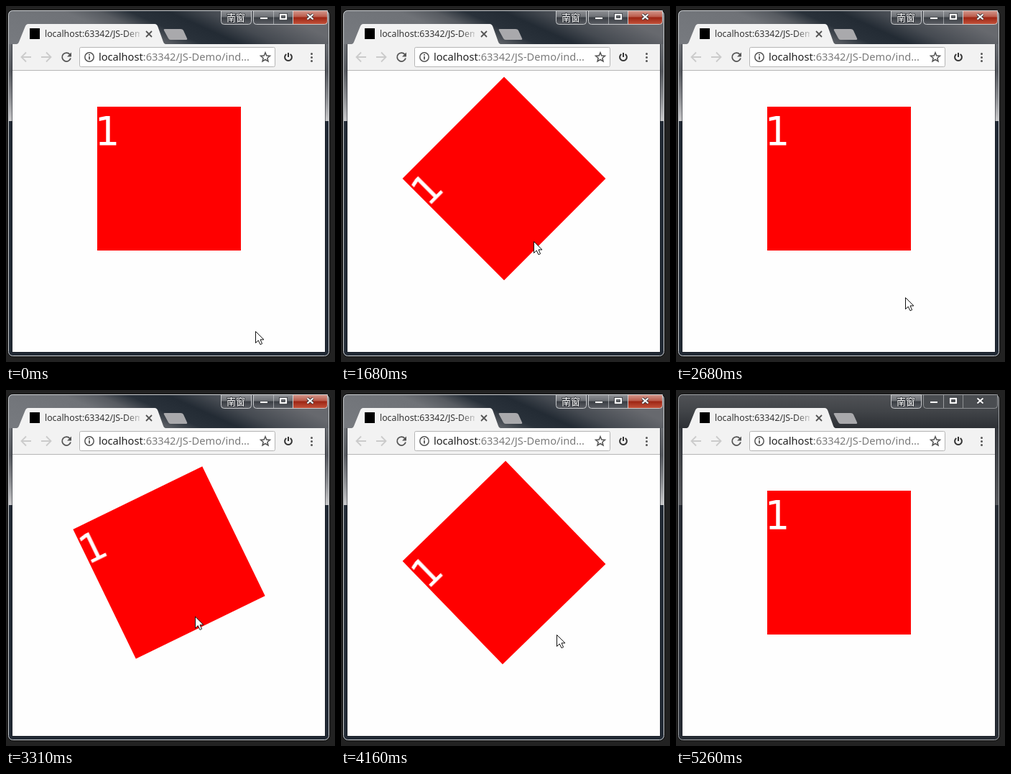
These frames come from a looping animation (458x495 px, 5.36 s). An HTML page:

```html
<!DOCTYPE html>
<html lang="en">
<head>
<meta charset="utf-8">
<title>Rotating box</title>
<style>
  html, body { margin: 0; width: 100%; height: 100%; overflow: hidden; background: #222; }
  svg { display: block; width: 458px; height: 495px; }
  text { font-family: "Noto Sans", "Open Sans", sans-serif; }
  #box { transform-origin: 227px 240px; }
  .icon { fill: none; stroke: #555; stroke-width: 1.8; }
  .off { stroke: #cbcbcb; }
  .idle { display: none; }
  .blur .idle { display: inline; }
  .blur .live { display: none; }
</style>
</head>
<body>
<svg id="stage" viewBox="0 0 458 495">
  <defs>
    <linearGradient id="bar" gradientUnits="userSpaceOnUse" x1="-19" y1="42" x2="71" y2="-158">
      <stop stop-color="#777a7f"/><stop offset=".33" stop-color="#6f7277"/>
      <stop offset=".42" stop-color="#575b61"/><stop offset=".5" stop-color="#29313a"/>
      <stop offset=".6" stop-color="#232b34"/><stop offset=".7" stop-color="#454a51"/>
      <stop offset=".87" stop-color="#67696e"/>
    </linearGradient>
    <linearGradient id="side" x2="0" y2="1">
      <stop stop-color="#6a6d72"/><stop offset=".35" stop-color="#54575d"/>
      <stop offset=".7" stop-color="#8b8d91"/><stop offset="1" stop-color="#c8c8ca"/>
    </linearGradient>
    <linearGradient id="idleBar" x2="0" y2="1">
      <stop stop-color="#505256"/><stop offset=".5" stop-color="#414448"/><stop offset="1" stop-color="#2d3035"/>
    </linearGradient>
    <linearGradient id="idleSide" x2="0" y2="1">
      <stop stop-color="#35383d"/><stop offset="1" stop-color="#56585c"/>
    </linearGradient>
    <linearGradient id="btn" x2="0" y2="1">
      <stop stop-color="#8f9195"/><stop offset=".45" stop-color="#6c6f74"/>
      <stop offset=".5" stop-color="#3a3e44"/><stop offset="1" stop-color="#5c5f65"/>
    </linearGradient>
    <linearGradient id="red" x2="0" y2="1">
      <stop stop-color="#d49a8f"/><stop offset=".45" stop-color="#bb5a4a"/>
      <stop offset=".5" stop-color="#9c2413"/><stop offset="1" stop-color="#c4543c"/>
    </linearGradient>
    <linearGradient id="fade" gradientUnits="userSpaceOnUse" x1="166" x2="187">
      <stop stop-color="#333"/><stop offset="1" stop-color="#333" stop-opacity=".15"/>
    </linearGradient>
    <clipPath id="win"><rect x="3" y="6" width="447" height="481" rx="6"/></clipPath>
    <clipPath id="tabClip"><rect x="50" y="28" width="136" height="24"/></clipPath>
    <g id="glyphs" fill="none">
      <path d="M354 17H364"/>
      <rect x="382" y="12" width="8" height="6"/>
      <path d="M419.500 11.500L427.500 18.500M427.500 11.500L419.500 18.500"/>
    </g>
  </defs>

  <rect width="458" height="495" fill="#222"/>

  <!-- window glass -->
  <g clip-path="url(#win)">
    <g class="live">
      <rect x="3" y="6" width="447" height="481" fill="#222a35"/>
      <rect x="3" y="53" width="447" height="107" fill="url(#side)"/>
      <rect x="3" y="6" width="447" height="47" fill="url(#bar)"/>
    </g>
    <g class="idle">
      <rect x="3" y="6" width="447" height="481" fill="#282d35"/>
      <rect x="3" y="53" width="447" height="107" fill="url(#idleSide)"/>
      <rect x="3" y="6" width="447" height="47" fill="url(#idleBar)"/>
    </g>
  </g>
  <rect x="2.500" y="5.500" width="448" height="482" rx="6.500" fill="none" stroke="#111"/>
  <rect class="live" x="3.500" y="6.500" width="446" height="480" rx="6" fill="none" stroke="#cdd0d3"/>
  <rect class="idle" x="3.500" y="6.500" width="446" height="480" rx="6" fill="none" stroke="#a3a6a9"/>
  <path d="M8.500 53V481.500H444.500V53" fill="none" stroke="#0c1118" stroke-opacity=".5"/>

  <!-- caption buttons -->
  <g stroke="#d2d4d6" stroke-opacity=".9">
    <path d="M299.500 6.500H341.500V21.500Q341.500 25.500 337.500 25.500H303.500Q299.500 25.500 299.500 21.500Z" fill="url(#btn)"/>
    <g class="live">
      <path d="M344.500 6.500H400V25.500H348.500Q344.500 25.500 344.500 21.500Z" fill="url(#btn)"/>
      <path d="M399.500 6.500H447.500V21.500Q447.500 25.500 443.500 25.500H399.500Z" fill="url(#red)"/>
    </g>
    <path class="idle" d="M344.500 6.500H447.500V21.500Q447.500 25.500 443.500 25.500H348.500Q344.500 25.500 344.500 21.500ZM399.500 7V25" fill="#4a4d51" stroke-opacity=".5"/>
    <path d="M372.500 7V25" stroke-opacity=".6"/>
  </g>
  <text x="307" y="20.500" font-size="13" font-weight="500" fill="#fff" stroke="#33363b" stroke-width="1.500" paint-order="stroke" style="font-family:'Noto Sans CJK SC','Noto Sans CJK',sans-serif">南窗</text>
  <use href="#glyphs" stroke="#33363b" stroke-width="4"/>
  <use href="#glyphs" stroke="#f8f8f8" stroke-width="2.300"/>

  <!-- tab strip and toolbar -->
  <path d="M220 34Q219 32 221 32H243Q246 32 247 34L252 45Q253 47 250 47H229Q227 47 226 45Z" fill="#a9a9ac"/>
  <path d="M9 53H15Q17 53 18 50L26.500 29Q28 25 31 25H207Q210 25 211.500 29L219 50Q220 53 222 53H444V90H9Z" fill="#f2f2f2"/>
  <rect x="33" y="31" width="14" height="15"/>
  <text x="54" y="43" font-size="12.300" fill="url(#fade)" clip-path="url(#tabClip)">localhost:63342/JS-Demo</text>
  <path class="icon" d="M195 35L203 43M203 35L195 43"/>
  <path d="M9 89.500H444" stroke="#b6b6b6"/>

  <path class="icon off" d="M35 71H22M28 64.500L21.500 71L28 77.500"/>
  <path class="icon off" d="M49 71H62M56 64.500L62.500 71L56 77.500"/>
  <path class="icon" d="M88.800 67.200A6 6 0 1 0 90 72.500"/>
  <path d="M91 64.500V70.500H85Z" fill="#555"/>

  <rect x="102.500" y="57.500" width="272" height="27" rx="2" fill="#fff" stroke="#b5b5b5"/>
  <circle class="icon" cx="116" cy="71" r="6.200" style="stroke-width:1.500"/>
  <path class="icon" d="M116 70V74.500M116 67V68.700"/>
  <text x="129" y="76" font-size="14.620" fill="#222">localhost<tspan fill="#7b7b7b">:63342/JS-Demo/ind...</tspan></text>
  <path id="star" class="icon" style="stroke-width:1.500"/>
  <path class="icon" d="M390.300 67A4.900 4.900 0 1 0 395.700 67M393 65V71" style="stroke:#333;stroke-width:2"/>
  <g fill="#555"><circle cx="425.500" cy="66.500" r="1.500"/><circle cx="425.500" cy="71.500" r="1.500"/><circle cx="425.500" cy="76.500" r="1.500"/></g>

  <!-- page -->
  <rect x="9" y="90" width="435" height="391" fill="#fefefe"/>
  <g id="box">
    <rect x="127" y="140" width="200" height="200" fill="#f00"/>
    <text x="123.800" y="193.300" font-size="54.500" fill="#fff" style="font-family:'DejaVu Sans',sans-serif">1</text>
  </g>
  <path id="cursor" d="M.5 .5V16.500L4.200 13L7 18.700L9.600 17.500L7 11.900H12Z" fill="#fff" stroke="#111"/>
</svg>
<script>
  const LOOP = 5360, GONE = 4640, BLUR = 5260;
  const $ = id => document.getElementById(id);

  // Moments at which the screen refreshes.
  const ticks = [0, 810, 880, 1180, 1260, 1320, 1390, 1460, 1530, 1600, 1680,
    1740, 1820, 1900, 1980, 2320, 2390, 2460, 2530, 2600, 2680,
    3240, 3310, 3370, 3440, 3510, 4100, 4170, 4240, 4320, 4390, 4580, GONE, BLUR];

  // Pointer path: time, x, y.
  const path = [
    [0, 347, 452], [810, 339, 443], [880, 346, 452], [1180, 345, 448],
    [1260, 331, 420], [1390, 279, 336], [1460, 272, 330], [1680, 268, 327],
    [1980, 263, 311], [2320, 285, 350], [2680, 319, 405], [3240, 270, 325],
    [3510, 243, 285], [4100, 300, 340], [4390, 348, 394], [4580, 367, 421],
    [LOOP, 367, 421]
  ];

  // Hover changes: start time, angle before, angle after.
  const TURN = 300;
  const turns = [[1370, 0, -45], [2370, -45, 0], [3210, 0, -45], [4090, -45, 0]];

  const rotate = (t, deg, easing = 'linear') =>
    ({ offset: t / LOOP, transform: `rotate(${deg}deg)`, easing });

  function timeline(el, frames) {
    const anim = el.animate(frames, { duration: LOOP, fill: 'both' });
    anim.pause();
    return anim;
  }

  const anims = [
    timeline($('box'), [
      rotate(0, 0),
      ...turns.flatMap(([t, from, to]) => [rotate(t, from, 'ease'), rotate(t + TURN, to)]),
      rotate(LOOP, 0)
    ]),
    timeline($('cursor'), path.map(([t, x, y]) =>
      ({ offset: t / LOOP, transform: `translate(${x}px, ${y}px)` })))
  ];

  const points = Array.from({ length: 10 }, (_, i) => {
    const r = i % 2 ? 3 : 6.8, a = i * Math.PI / 5;
    return [361 + r * Math.sin(a), 71.5 - r * Math.cos(a)];
  });
  $('star').setAttribute('d', 'M' + points.join('L') + 'Z');

  const start = performance.now();
  function draw() {
    const now = (performance.now() - start) % LOOP;
    const t = ticks.filter(k => k <= now).pop();
    anims.forEach(a => a.currentTime = t);
    $('cursor').style.visibility = t < GONE ? 'visible' : 'hidden';
    $('stage').classList.toggle('blur', t >= BLUR);
    requestAnimationFrame(draw);
  }
  draw();
</script>
</body>
</html>
```
